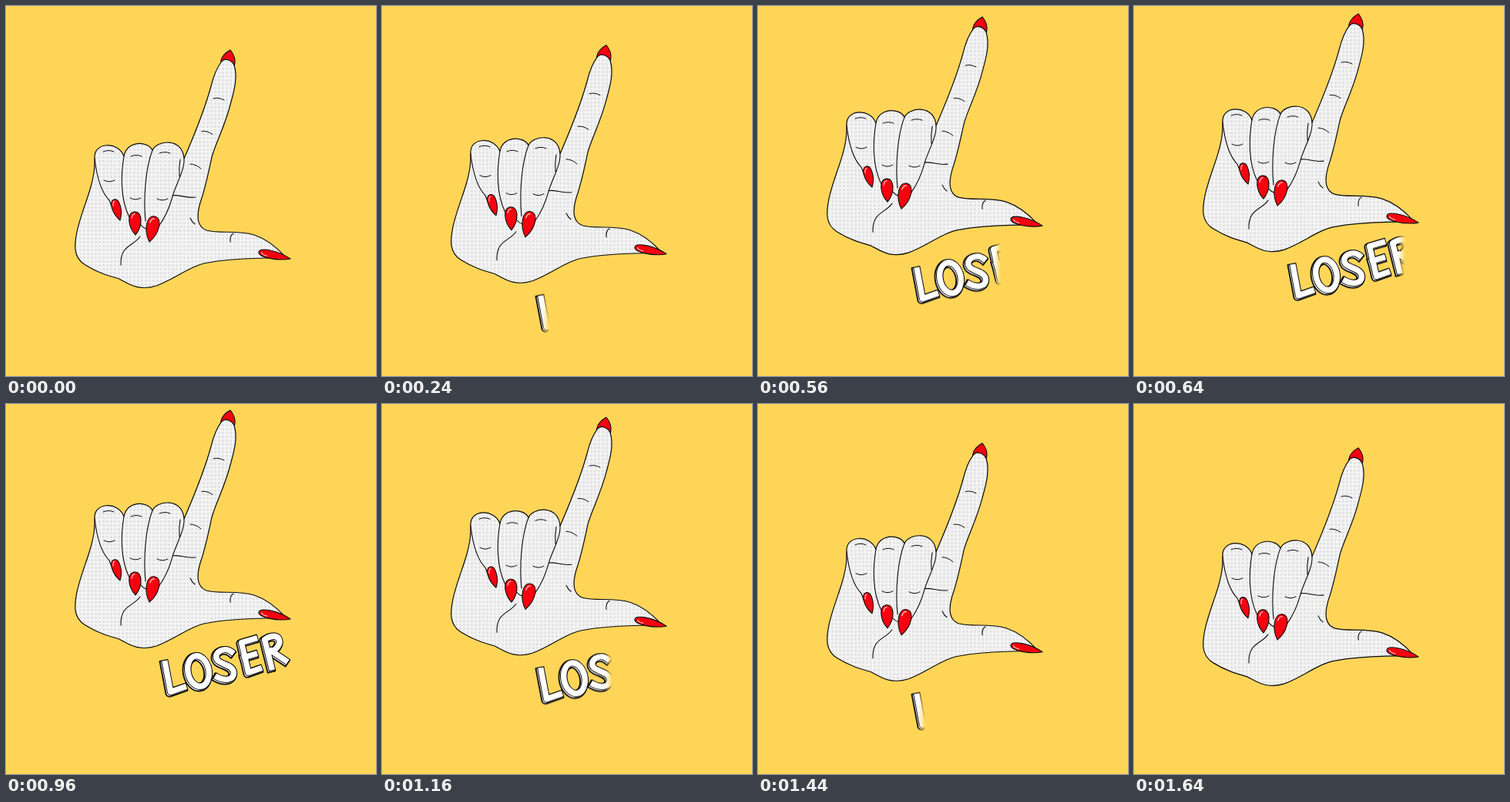
These frames come from a looping animation (480 by 480 pixels, 1.68 s). An HTML page with a canvas:

```html
<!DOCTYPE html>
<html lang="en">
<head>
<meta charset="utf-8">
<title>Loser</title>
<style>
  html, body { margin: 0; width: 100%; height: 100%; overflow: hidden; background: #ffd558; }
  canvas { display: block; width: 480px; height: 480px; }
</style>
</head>
<body>
<canvas id="stage" width="480" height="480" role="img" aria-label="LOSER"></canvas>
<script>
const SIZE = 480, STEP = 40, STEPS = 42, LIFT = 50;
const INK = '#0b0b0b', RED = '#f7000f', YELLOW = '#ffd558';

function makeCanvas(size) {
  const canvas = document.createElement('canvas');
  canvas.width = canvas.height = size;
  return canvas;
}

const ctx = document.getElementById('stage').getContext('2d');
const layer = makeCanvas(SIZE);
const text = layer.getContext('2d');

const indexFinger = `M231 198C244 168 259 130 266 104C269 92 272 82 279 73
  C283 67 292 69 296 77C301 92 296 110 291 128C284 156 271 180 267 196
  C263 214 259 235 252 255`;
const thumb = 'C247 272 247 286 260 291C280 296 298 290 322 297C340 303 352 314 362 325';
const palm = `C335 329 305 325 262 333C240 336 220 354 195 363C172 370 160 361 147 354
  C133 350 119 346 103 336C86 326 89 308 92 293C96 274 104 255 109 238C115 218 115 208 115 198`;
const knuckles = 'C113 176 146 175 153 195C156 175 183 174 190 187C196 174 229 170 231 198';
const hand = new Path2D(indexFinger + thumb + palm + knuckles);

const fingerSides = `M115 198C117 215 122 240 134 252L137 260M153 195C149 218 148 250 160 274
  M190 187C181 210 178 250 181 279M231 198C232 213 220 232 216 247C212 262 206 275 198 286`;
const palmLines = `M175 284Q178 288 182 289M149 336C148 310 165 312 174 299M295 295Q290 298 291 306
  M226 199Q224 210 225 221M216 246C226 244 232 250 246 248M239 275Q241 280 245 283`;
const folds = new Path2D(fingerSides + palmLines);

const ring = new Path2D();
ring.ellipse(249, 396, 13.5, 20, -0.2, 0, Math.PI * 2);
const letters = [
  new Path2D('M206 386L213 423L230 417'),
  ring,
  new Path2D('M292 371C282 363 267 373 274 382C280 388 294 388 295 398C295 409 281 408 274 404'),
  new Path2D('M322 354L305 359L314 398L328 393M309 378L322 374'),
  new Path2D('M344 391L335 355C356 341 363 365 340 372M344 370L362 382')
];

const tile = makeCanvas(5);
const weave = tile.getContext('2d');
weave.fillStyle = '#f4f4f4';
weave.fillRect(0, 0, 5, 5);
weave.fillStyle = '#e3e3e3';
weave.fillRect(0, 0, 3, 3);
const skin = ctx.createPattern(tile, 'repeat');

function stroke(c, path, width, color) {
  c.lineWidth = width;
  c.strokeStyle = color;
  c.stroke(path);
}

// Teardrop from its round base to its pointed tip.
function nail(baseX, baseY, tipX, tipY, width) {
  const length = Math.hypot(tipX - baseX, tipY - baseY), side = width * 0.68;
  const drop = new Path2D();
  drop.moveTo(length, 0);
  drop.bezierCurveTo(length * 0.6, side, 0, side, 0, 0);
  drop.bezierCurveTo(0, -side, length * 0.6, -side, length, 0);
  const shine = new Path2D();
  shine.ellipse(length * 0.35, 0, length * 0.26, width * 0.3, 0, Math.PI * 0.6, Math.PI);
  ctx.save();
  ctx.translate(baseX, baseY);
  ctx.rotate(Math.atan2(tipY - baseY, tipX - baseX));
  ctx.fillStyle = RED;
  ctx.fill(drop);
  stroke(ctx, drop, 1.1, INK);
  stroke(ctx, shine, 1.2, '#ffc9cc');
  ctx.restore();
}

function crease(x, y, bend, tilt = 0) {
  const line = new Path2D();
  line.moveTo(x - 7, y - tilt);
  line.quadraticCurveTo(x, y - bend, x + 7, y + tilt);
  stroke(ctx, line, 1, INK);
}

function drawHand() {
  ctx.lineCap = ctx.lineJoin = 'round';
  nail(286, 82, 291, 57, 18);
  ctx.fillStyle = skin;
  ctx.fill(hand);
  stroke(ctx, hand, 1.2, INK);
  stroke(ctx, folds, 1.1, INK);
  for (const [x, top, bottom] of [[133, 189, 226], [169, 195, 249], [206, 191, 250]]) {
    crease(x, top, 3);
    crease(x + (133 - x) / 18 + 1, bottom, -4);
  }
  for (let i = 0; i < 3; i++) crease(276 - 15 * i, 121 + 43.5 * i, 3, 1 + i);
  nail(140, 251, 148, 278, 11);
  nail(167, 267, 168, 297, 15);
  nail(193, 273, 186, 306, 16);
  nail(328, 319, 369, 328, 10);
}

// Bubble letters with a small extrusion, wiped by a soft edge.
function drawText(edge) {
  const slab = (path, shift, outline, face) => {
    text.save();
    text.translate(shift, -shift);
    stroke(text, path, outline, INK);
    stroke(text, path, face, '#fff');
    text.restore();
  };
  text.globalCompositeOperation = 'source-over';
  text.clearRect(0, 0, SIZE, SIZE);
  text.lineCap = 'square';
  text.lineJoin = 'round';
  for (const path of letters) {
    slab(path, -0.8, 11.6, 8);
    slab(path, 0.5, 9.4, 7.4);
  }
  const fade = text.createLinearGradient(edge - 8, 0, edge + 1, 0);
  fade.addColorStop(0, '#000');
  fade.addColorStop(1, 'transparent');
  text.globalCompositeOperation = 'destination-in';
  text.fillStyle = fade;
  text.fillRect(0, 0, SIZE, SIZE);
  ctx.drawImage(layer, 0, 0);
}

// Cubic Bezier easing (.58, 0, .36, 1), solved by bisection.
function ease(x) {
  let lo = 0, hi = 1;
  for (let i = 0; i < 24; i++) {
    const u = (lo + hi) / 2, w = 1 - u;
    if (3 * u * w * w * 0.58 + 3 * u * u * w * 0.36 + u ** 3 < x) lo = u; else hi = u;
  }
  return lo * lo * (3 - 2 * lo);
}

const wipeEdge = age => 198 + 9 * age + 0.026 * age ** 3;

function render(ms) {
  const step = Math.floor(ms / STEP) % STEPS;
  const pose = Math.min(step, STEPS - step);
  ctx.setTransform(1, 0, 0, 1, 0, 0);
  ctx.fillStyle = YELLOW;
  ctx.fillRect(0, 0, SIZE, SIZE);
  ctx.translate(0, -LIFT * ease(pose * 2 / STEPS));
  drawHand();
  if (pose > 4) drawText(wipeEdge(pose - 4));
}

let start;
function tick(now) {
  start ??= now;
  render(now - start);
  requestAnimationFrame(tick);
}
render(0);
requestAnimationFrame(tick);
</script>
</body>
</html>
```
